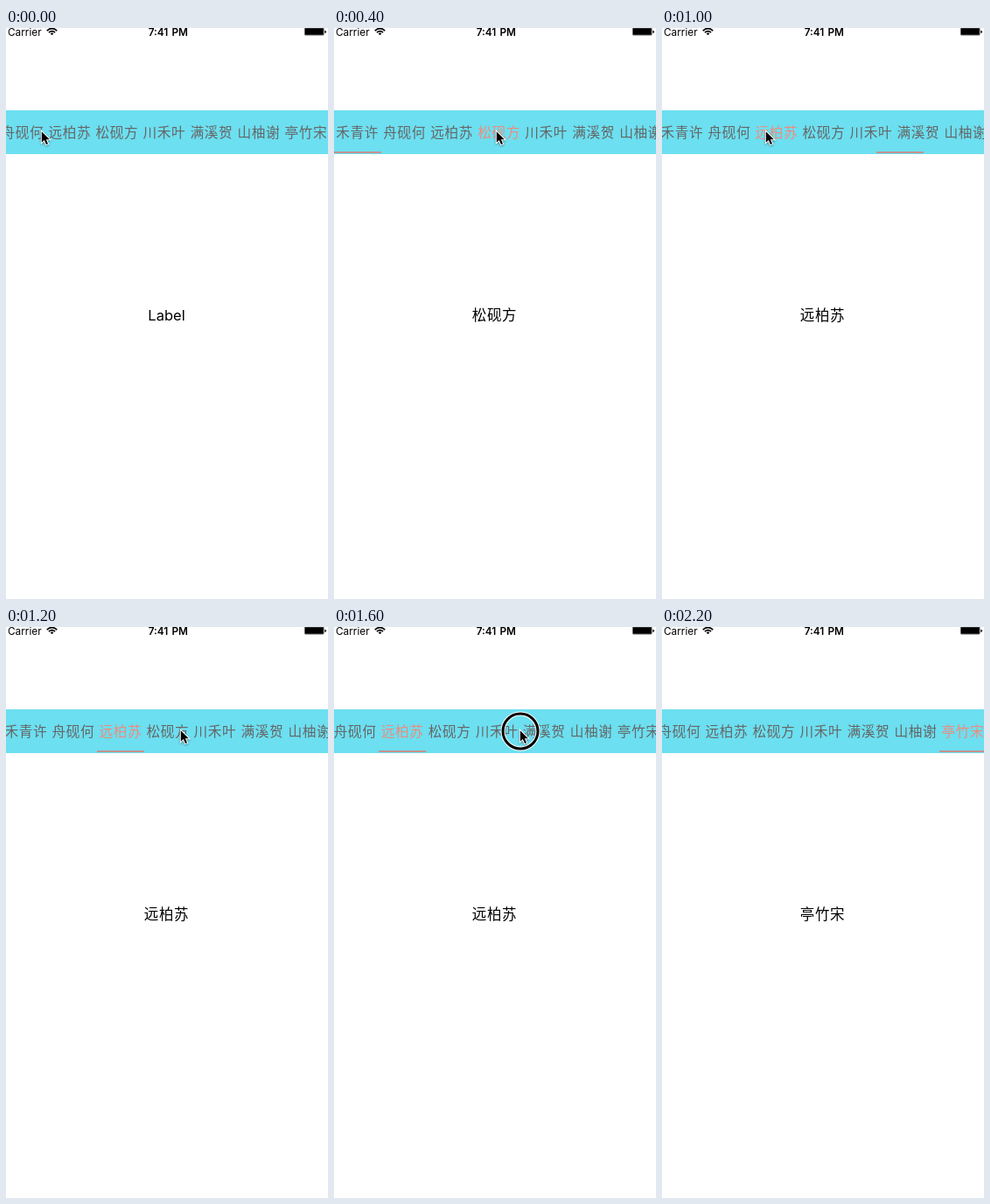
An HTML page that plays this animation: 368x652 px, repeating every 2400 ms.

```html
<!DOCTYPE html>
<html lang="zh-CN">
<head>
<meta charset="utf-8">
<title>Tab bar</title>
<style>
html, body { margin: 0; width: 100%; height: 100%; overflow: hidden; background: #fff; }
svg { display: block; }
text { font-family: Inter, "Noto Sans CJK SC", "Noto Sans CJK", sans-serif; }
.status { font-size: 11.8px; word-spacing: 1.2px; }
#tabs text { font-size: 15.7px; letter-spacing: .55px; fill: #666; }
#tabs text.on { fill: #ee8b7c; }
#label { font-size: 16.5px; text-anchor: middle; }
#label.name { letter-spacing: .6px; }
#arrow { filter: drop-shadow(0 1px 1px #0006); }
</style>
</head>
<body>
<svg width="368" height="652" viewBox="0 0 368 652">
  <text class="status" x="2" y="8.6">Carrier</text>
  <g fill="none" stroke="#000" stroke-width="1.7">
    <path d="M46.8 3.1Q52.5 -2.1 58.2 3.1M48.9 5.2Q52.5 1.9 56.1 5.2"/>
    <path d="M50.6 6.2Q52.5 4.7 54.4 6.2L52.5 8.3Z" fill="#000" stroke="none"/>
  </g>
  <text class="status" x="185.3" y="8.6" text-anchor="middle" font-weight="600">7:41 PM</text>
  <rect x="341" y="-.5" width="22.5" height="9" rx="1.5" fill="#555"/>
  <rect x="342" y=".5" width="20.5" height="7" rx=".5"/>
  <path d="M364.3 2.7Q366 3 366 4.4T364.3 6.1Z"/>

  <rect y="94" width="368" height="50" fill="#6cdff0"/>
  <g id="tabs"><rect id="line" y="141" width="54" height="2" fill="#c4918f"/></g>
  <text id="label" x="183.5" y="333.7"></text>

  <g id="cursor">
    <g id="ring" fill="none">
      <circle cx="1" cy="2" r="20" stroke="#fff" stroke-width="5"/>
      <circle cx="1" cy="2" r="20" stroke="#000" stroke-width="3"/>
    </g>
    <path id="arrow" d="M.8 1.2V13.8L3.8 11 6 16 8 15.2 5.9 10.3H9.8Z" stroke="#fff" stroke-width="2" paint-order="stroke"/>
  </g>
</svg>
<script>
const names = ["禾青许", "舟砚何", "远柏苏", "松砚方", "川禾叶", "满溪贺", "山柚谢", "亭竹宋"];
const LOOP = 2400, STEP = 100, PITCH = 54, SLIDE = 200, HOLD = 100;

// All times in ms. A tap selects its tab on release, after a short hold.
const taps = [
  { time: 0, tab: 0 }, { time: 400, tab: 3 }, { time: 610, tab: 4 },
  { time: 740, tab: 5 }, { time: 955, tab: 2 }, { time: 1950, tab: 7 }
];
const drags = [
  { start: 50, end: 150, from: -62, to: 33 },
  { start: 1350, end: 1650, from: -4, to: -61 }
];
const OVERSCROLL_REST = -4, BOUNCE = 250;
const stops = [[0, 40], [200, 276], [400, 185], [600, 243], [700, 285], [1000, 118],
  [1400, 280], [1600, 212], [1800, 330], [2100, 352]];

const $ = id => document.getElementById(id);
const clamp = p => Math.max(0, Math.min(1, p));
const ease = p => p * p * (3 - 2 * p);
const mix = (a, b, p) => a + (b - a) * ease(clamp(p));

const tabs = names.map((name, i) => {
  const tab = document.createElementNS("http://www.w3.org/2000/svg", "text");
  tab.textContent = name;
  tab.setAttribute("x", i * PITCH + 2.5);
  tab.setAttribute("y", 124.7);
  return $("tabs").appendChild(tab);
});

function scrollAt(t) {
  const [right, left] = drags;
  const slide = d => mix(d.from, d.to, (t - d.start) / (d.end - d.start));
  if (t >= left.start) return slide(left);
  if (t <= 200) return slide(right);
  return mix(right.to, OVERSCROLL_REST, (t - 200) / BOUNCE);
}

function pointerAt(t) {
  const n = stops.findIndex(s => s[0] > t);
  if (n < 0) return stops.at(-1)[1];
  const [t0, x0] = stops[n - 1], [t1, x1] = stops[n];
  return mix(x0, x1, (t - t0) / (t1 - t0));
}

function draw(now) {
  const t = Math.floor(now % LOOP / STEP) * STEP;
  const pick = taps.findLast(tap => tap.time <= t).tab;
  const line = taps.reduce((x, tap) => mix(x, tap.tab, (t - tap.time) / SLIDE), 0);
  const pressed = drags.some(d => t >= d.start && t <= d.end)
    || taps.some(tap => t < tap.time && t >= tap.time - HOLD && tap.tab !== 2);

  $("tabs").setAttribute("transform", `translate(${scrollAt(t)} 0)`);
  $("line").setAttribute("x", line * PITCH);
  tabs.forEach((tab, i) => tab.classList.toggle("on", i === pick));
  $("label").textContent = pick ? names[pick] : "Label";
  $("label").classList.toggle("name", pick > 0);
  const y = 117 + mix(0, 17, (t - 1600) / 200);
  $("cursor").setAttribute("transform", `translate(${pointerAt(t)} ${y})`);
  $("cursor").style.display = t < 2100 ? "" : "none";
  $("ring").style.display = pressed ? "" : "none";
}

const start = performance.now();
function tick() {
  draw(performance.now() - start);
  requestAnimationFrame(tick);
}
tick();
</script>
</body>
</html>
```
